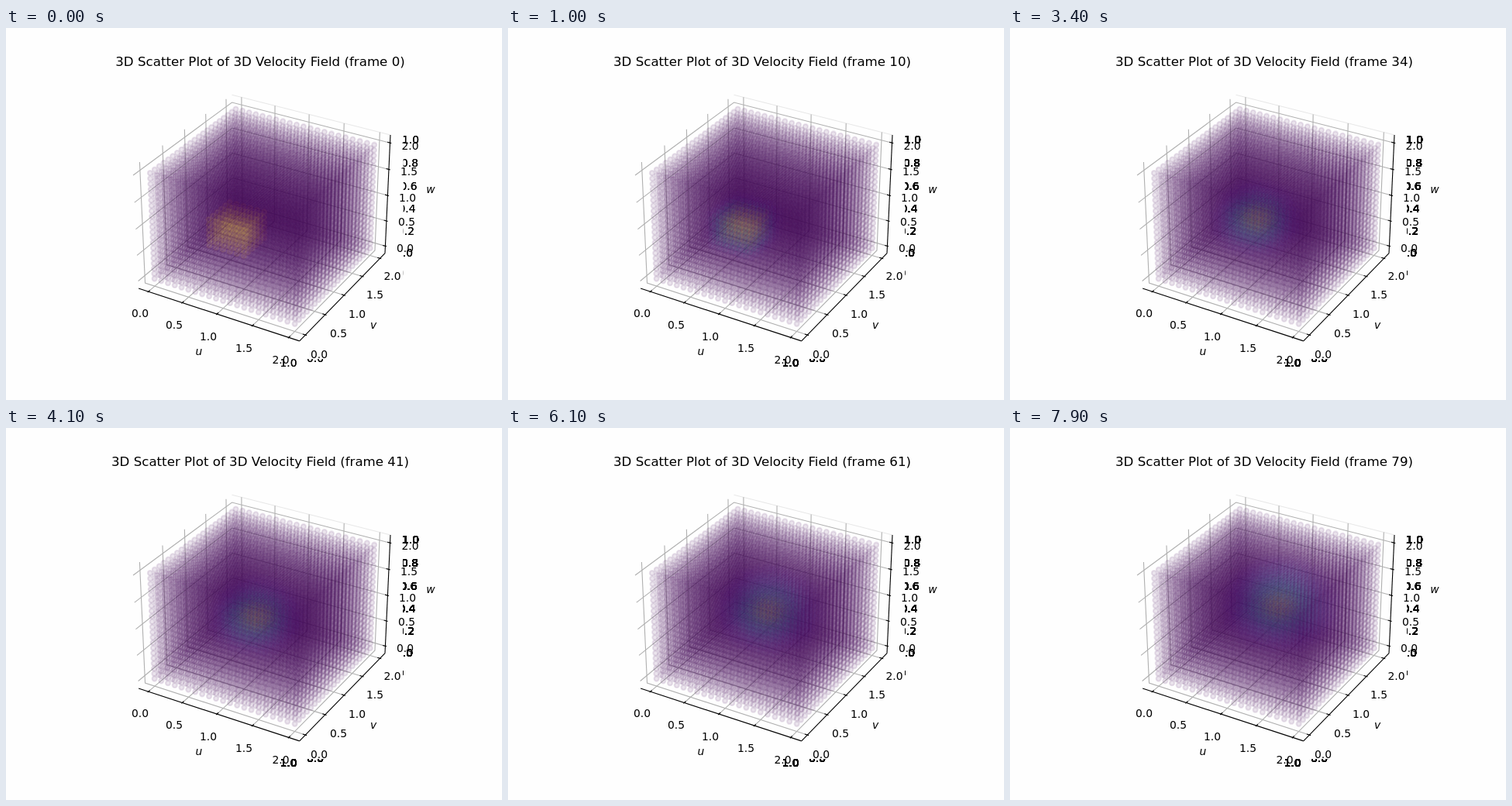
An HTML page with a canvas that plays this animation: 640 by 480 pixels, repeating every 8 s.

```html
<!DOCTYPE html>
<html lang="en">
<head>
<meta charset="utf-8">
<title>3D velocity field</title>
<style>
  html, body { margin: 0; width: 640px; height: 480px; overflow: hidden; background: #fefefe; }
  svg, canvas { position: absolute; left: 0; top: 0; display: block; }
  text { font-family: "DejaVu Sans", sans-serif; font-size: 13.89px; text-anchor: middle; fill: #000; }
  #title { font-size: 16.67px; }
  .axis { font-style: italic; }
  path { fill: none; stroke-width: 1.11; }
</style>
</head>
<body>
<svg id="plot" width="640" height="480" viewBox="0 0 640 480">
  <text id="title" x="328" y="48.5">3D Scatter Plot of 3D Velocity Field (frame 0)</text>
</svg>
<canvas id="field" width="640" height="480"></canvas>
<script>
const FRAMES = 80, STEP = 100;
const N = 21, DX = 0.1;
const COURANT = 0.0456, DIFFUSION = 0.011;
const ALPHA = 0.1, RADIUS = 3.1, EDGE = 2.08;
const LO = 1 - 1.1 * 25 / 24, HI = 2 - LO;
const CROP = { x: 160, y: 80, w: 340, h: 320 };

const svg = document.getElementById('plot');
const title = document.getElementById('title');
const ctx = document.getElementById('field').getContext('2d');

// Perspective view at elevation 30, azimuth -60, distance 10; returns [x, y, depth].
function project(x, y, z) {
  const s = 8 / 7 / 2.2, h = Math.sqrt(3) / 2;
  const a = (x - 1) * s, b = (y - 1) * s, c = (z - 1) * s * 0.75;
  const depth = 10 - (h / 2 * a - 0.75 * b + 0.5 * c);
  const k = 369.6 / 0.185 / depth;
  return [
    332.995 + k * (h * a + 0.5 * b),
    237.405 - k * (-0.25 * a + h / 2 * b + h * c),
    depth
  ];
}

function add(tag, attrs, text) {
  const el = document.createElementNS('http://www.w3.org/2000/svg', tag);
  for (const name in attrs) el.setAttribute(name, attrs[name]);
  if (text) el.textContent = text;
  svg.appendChild(el);
}

function line(stroke, ...points) {
  const d = points.map(p => project(...p).slice(0, 2).map(v => v.toFixed(2)).join(' '));
  add('path', { d: 'M' + d.join('L'), stroke });
}

function drawAxes() {
  const ticks = [0, 0.5, 1, 1.5, 2];
  const out = 2.2 / 120, into = -2 * out;
  line('#e8e8e8', [LO, HI, HI], [HI, HI, HI]);
  for (const t of ticks) {
    line('#b0b0b0', [t, LO, LO], [t, HI, LO], [t, HI, HI]);
    line('#b0b0b0', [HI, t, LO], [LO, t, LO], [LO, t, HI]);
    line('#b0b0b0', [LO, LO, t], [LO, HI, t], [HI, HI, t]);
  }
  line('#000', [LO, LO, LO], [HI, LO, LO]);
  line('#000', [HI, LO, LO], [HI, HI, LO]);
  line('#000', [HI, HI, LO], [HI, HI, HI]);
  for (const t of ticks) {
    line('#000', [t, LO - out, LO], [t, LO - into, LO]);
    line('#000', [HI + out, t, LO], [HI + into, t, LO]);
    line('#000', [HI + out, HI, t], [HI + into, HI, t]);
  }
  const labels = [
    [[173, 368], [217, 383], [261, 398], [307, 413], [354.5, 428]],
    [[404, 421], [429, 394], [453, 369], [476, 344], [498.5, 320]],
    [[515, 284], [517, 250], [518, 219], [520, 185], [521.5, 152]]
  ];
  for (const row of labels) {
    row.forEach(([x, y], i) => add('text', { x, y: y + 5 }, ticks[i].toFixed(1)));
  }
  add('text', { x: 249, y: 422, class: 'axis' }, 'u');
  add('text', { x: 474, y: 388, class: 'axis' }, 'v');
  add('text', { x: 548, y: 213, class: 'axis' }, 'w');
}

// Viridis as a degree-6 polynomial per channel.
const VIRIDIS = [
  [0.2777, 0.1051, -0.3309, -4.6342, 6.2283, 4.7764, -5.4355],
  [0.0054, 1.4046, 0.2148, -5.7991, 14.1799, -13.7451, 4.6459],
  [0.3341, 1.3846, 0.0951, -19.3324, 56.6906, -65.353, 26.3124]
];
const palette = Array.from({ length: 256 }, (_, i) => {
  const rgb = VIRIDIS.map(c => {
    const v = c.reduceRight((sum, k) => sum * i / 255 + k, 0);
    return Math.round(255 * Math.min(1, Math.max(0, v)));
  });
  return `rgba(${rgb},${ALPHA})`;
});

// Upwind advection plus diffusion of a box pulse; the field is its product over three axes.
const profiles = [Array.from({ length: N }, (_, i) => i >= 5 && i <= 10 ? 1 : 0)];
for (let f = 1; f < FRAMES; f++) {
  const p = profiles[f - 1];
  profiles.push(p.map((v, i) => {
    const left = p[i - 1] || 0, right = p[i + 1] || 0;
    return v - COURANT * (v - left) + DIFFUSION * (left - 2 * v + right);
  }));
}

const points = [];
for (let i = 0; i < N; i++)
  for (let j = 0; j < N; j++)
    for (let k = 0; k < N; k++) {
      const [x, y, depth] = project(i * DX, j * DX, k * DX);
      points.push({ i, j, k, x, y, depth });
    }
points.sort((a, b) => b.depth - a.depth);

const clouds = [];
function cloud(frame) {
  if (clouds[frame]) return clouds[frame];
  const layer = document.createElement('canvas');
  layer.width = CROP.w;
  layer.height = CROP.h;
  const c = layer.getContext('2d');
  c.translate(-CROP.x, -CROP.y);
  c.lineWidth = EDGE;
  const peak = Math.max(...profiles[frame]);
  const p = profiles[frame].map(v => v / peak);
  let last = -1;
  for (const { i, j, k, x, y } of points) {
    const shade = Math.min(255, Math.floor(256 * p[i] * p[j] * p[k]));
    if (shade !== last) {
      c.fillStyle = c.strokeStyle = palette[shade];
      last = shade;
    }
    c.beginPath();
    c.arc(x, y, RADIUS, 0, 2 * Math.PI);
    c.fill();
    c.stroke();
  }
  return clouds[frame] = layer;
}

// Tick labels of the covered unit axes, visible only outside the plot square.
const ghosts = [
  ['1.0', 522, 144], ['0.8', 521, 174], ['0.6', 519.5, 204],
  ['0.4', 517.5, 233], ['0.2', 516, 262], ['0.0', 514, 290],
  ['1.0', 364.5, 432], ['0.0', 399, 426], ['1.0', 502.6, 316]
];
function drawGhosts(frame) {
  ctx.save();
  ctx.beginPath();
  ctx.rect(512.8, 0, 127.2, 480);
  ctx.rect(0, 427.2, 512.8, 52.8);
  ctx.clip();
  ctx.font = '13.89px "DejaVu Sans", sans-serif';
  ctx.textAlign = 'center';
  ctx.fillStyle = '#000';
  const copies = Math.min(frame + 2, 40);
  for (let n = 0; n < copies; n++)
    for (const [text, x, y] of ghosts) ctx.fillText(text, x, y + 5);
  ctx.restore();
}

function show(frame) {
  title.textContent = `3D Scatter Plot of 3D Velocity Field (frame ${frame})`;
  ctx.clearRect(0, 0, 640, 480);
  drawGhosts(frame);
  ctx.drawImage(cloud(frame), CROP.x, CROP.y);
}

let start, shown = -1;
function tick(now) {
  if (start === undefined) start = now;
  const frame = Math.floor(Math.max(0, now - start) / STEP) % FRAMES;
  if (frame !== shown) show(shown = frame);
  requestAnimationFrame(tick);
}

drawAxes();
show(shown = 0);
requestAnimationFrame(tick);
</script>
</body>
</html>
```
